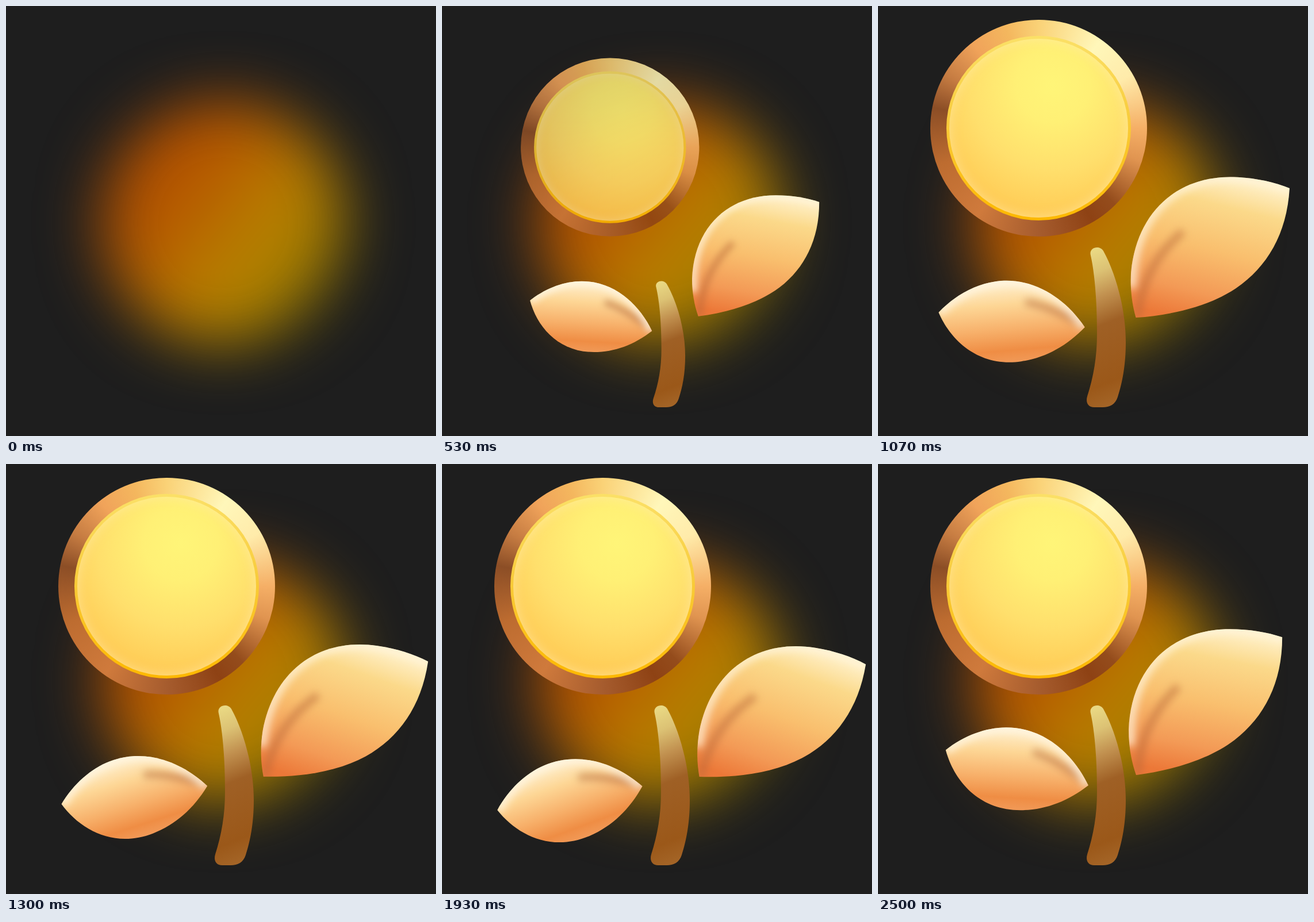
Write an HTML page that moves like this. It is 748x748 px and loops after 4.01 s.

```html
<!DOCTYPE html>
<html lang="en">
<head>
<meta charset="utf-8">
<title>Flower</title>
<style>
  html, body { margin: 0; width: 100%; height: 100%; overflow: hidden; background: #1e1e1e; }
  svg { position: absolute; left: 0; top: 0; }
  #sun {
    position: absolute; left: 91px; top: 24px; width: 376.5px; height: 376.5px;
    border-radius: 50%; transform-origin: 260.7px 376px;
    background: conic-gradient(#fad277, #fff7ba 35deg, #ffebaa 60deg, #f5af66 90deg,
      #e09450 108deg, #944c1c 135deg, #8e4214 150deg, #a65c2e 180deg, #cf7a3c 215deg,
      #bd6c30 250deg, #8c4e26 281deg, #c67c42 300deg, #f0a35a 322deg, #f4b75e 342deg, #fad277);
  }
  #rim, #face { position: absolute; border-radius: 50%; }
  #rim { inset: 28px; background: linear-gradient(#fbe067, #f8cc3c 45%, #fdb800); }
  #face {
    inset: 33px; box-shadow: inset 0 0 20px rgba(255, 238, 175, .65);
    background: radial-gradient(circle at 58% 26%, #fff578 0, #fff075 22%, #ffdf6c 50%, #ffcb55 78%, #ffc14a);
  }
</style>
</head>
<body>
<svg width="748" height="748" viewBox="0 0 748 748">
  <defs>
    <linearGradient id="warm" x1=".1" y1=".2" x2=".95" y2=".9">
      <stop offset=".1" stop-color="#b35000"/>
      <stop offset=".3" stop-color="#b65a00"/>
      <stop offset=".55" stop-color="#b87e00"/>
      <stop offset=".78" stop-color="#a88000"/>
      <stop offset="1" stop-color="#4e5208"/>
    </linearGradient>
    <linearGradient id="fillL" x1=".55" y1="0" x2=".45" y2="1">
      <stop offset="0" stop-color="#fff3d6"/>
      <stop offset=".3" stop-color="#fdd695"/>
      <stop offset=".6" stop-color="#f7b06a"/>
      <stop offset=".85" stop-color="#ef8d44"/>
      <stop offset="1" stop-color="#f19a58"/>
    </linearGradient>
    <linearGradient id="fillR" x1=".6" y1="0" x2=".4" y2="1">
      <stop offset="0" stop-color="#fff0c8"/>
      <stop offset=".2" stop-color="#fbd98a"/>
      <stop offset=".5" stop-color="#f9bf6e"/>
      <stop offset=".8" stop-color="#f39a56"/>
      <stop offset="1" stop-color="#ec7838"/>
    </linearGradient>
    <linearGradient id="bark" x1=".4" y1="0" x2=".5" y2="1">
      <stop offset="0" stop-color="#e9d883"/>
      <stop offset=".14" stop-color="#dcc274"/>
      <stop offset=".3" stop-color="#c1904f"/>
      <stop offset=".48" stop-color="#9f6025"/>
      <stop offset=".85" stop-color="#9b5819"/>
      <stop offset="1" stop-color="#a46527"/>
    </linearGradient>
    <filter id="haze" x="-50%" y="-50%" width="200%" height="200%" color-interpolation-filters="sRGB">
      <feGaussianBlur stdDeviation="52"/>
    </filter>
    <filter id="soft" x="-30%" y="-30%" width="160%" height="160%" color-interpolation-filters="sRGB">
      <feGaussianBlur stdDeviation="7"/>
    </filter>
    <path id="shapeL" d="M118 497C150 472 188 458 223 458C290 458 340 505 366 559C330 587 290 602 248 602C175 602 132 550 118 497Z"/>
    <path id="shapeR" d="M449 541C440 515 436 490 436 462C440 355 510 287 612 287C645 287 676 292 703 301C703 380 672 440 620 480C575 514 512 533 449 541Z"/>
    <clipPath id="clipL"><use href="#shapeL"/></clipPath>
    <clipPath id="clipR"><use href="#shapeR"/></clipPath>
  </defs>

  <circle cx="378" cy="377" r="213" fill="url(#warm)" filter="url(#haze)"/>

  <path id="stem" fill="url(#bark)" d="M370 434C366 420 385 415 392 426C415 468 431 530 431 585C431 625 425 655 417 680C413 693 403 698 391 698L376 698C365 698 361 689 364 679C375 645 381 610 381 570C381 522 378 470 370 434Z"/>

  <g id="leafL">
    <use href="#shapeL" fill="url(#fillL)"/>
    <g clip-path="url(#clipL)" fill="none">
      <g filter="url(#soft)">
        <path d="M270 501C305 512 338 535 368 561" stroke="#b56a3c" stroke-opacity=".6" stroke-width="11"/>
        <path d="M118 497C150 472 188 458 223 458C290 458 340 505 366 559" stroke="#fff6e2" stroke-opacity=".85" stroke-width="17"/>
      </g>
    </g>
  </g>

  <g id="leafR">
    <use href="#shapeR" fill="url(#fillR)"/>
    <g clip-path="url(#clipR)" fill="none">
      <g filter="url(#soft)">
        <path d="M452 543C454 480 477 430 522 387" stroke="#b9683a" stroke-opacity=".55" stroke-width="13"/>
        <path d="M438 490C432 355 510 287 612 287C645 287 676 292 703 301" stroke="#fff4da" stroke-opacity=".8" stroke-width="16"/>
      </g>
    </g>
  </g>
</svg>
<div id="sun"><div id="rim"></div><div id="face"></div></div>

<script>
const LOOP = 4010, FRAME = 1000 / 30, LAST = 75;
const el = id => document.getElementById(id);
const sun = el("sun"), stem = el("stem"), leafL = el("leafL"), leafR = el("leafR");
const clamp = x => Math.min(1, Math.max(0, x));

// cubic-bezier(.42, 0, .58, 1)
function easeInOut(x) {
  let lo = 0, hi = 1;
  for (let i = 0; i < 20; i++) {
    const s = (lo + hi) / 2, r = 1 - s;
    if (1.26 * s * r * r + 1.74 * s * s * r + s * s * s < x) lo = s; else hi = s;
  }
  return lo * lo * (3 - 2 * lo);
}

const ramp = (t, start, dur) => easeInOut(clamp((t - start) / dur));

function place(node, x, y, sx, sy, turn) {
  node.setAttribute("visibility", sy > .006 ? "visible" : "hidden");
  node.setAttribute("transform",
    `translate(${x} ${y}) rotate(${turn}) scale(${sx} ${sy}) translate(${-x} ${-y})`);
}

function draw(ms) {
  // 30 fps steps on a 10 ms clock, then a rest
  const t = Math.min(LAST, Math.floor((Math.floor(ms / 10) * 10 + 5) / FRAME)) * FRAME;
  const swing = t < 1640 ? ramp(t, 740, 900) : 1 - ramp(t, 1640, 900);

  const size = ramp(t, -37, 805);
  sun.style.visibility = size > .006 ? "visible" : "hidden";
  sun.style.transform = `scale(${size})`;
  sun.style.opacity = clamp(t / 620);

  const left = ramp(t, -37, 775);
  place(leafL, 361, 602, left, left, -30 * swing);
  const right = ramp(t, -37, 800);
  place(leafR, 430, 534, right, right, 12 * swing);

  const rise = 1 - (1 - clamp((t - 119) / 765)) ** 2;
  place(stem, 385, 698, 1 - .82 * (1 - rise), rise, 0);
}

const begin = performance.now();
function tick() {
  draw((performance.now() - begin) % LOOP);
  requestAnimationFrame(tick);
}
tick();
</script>
</body>
</html>
```
